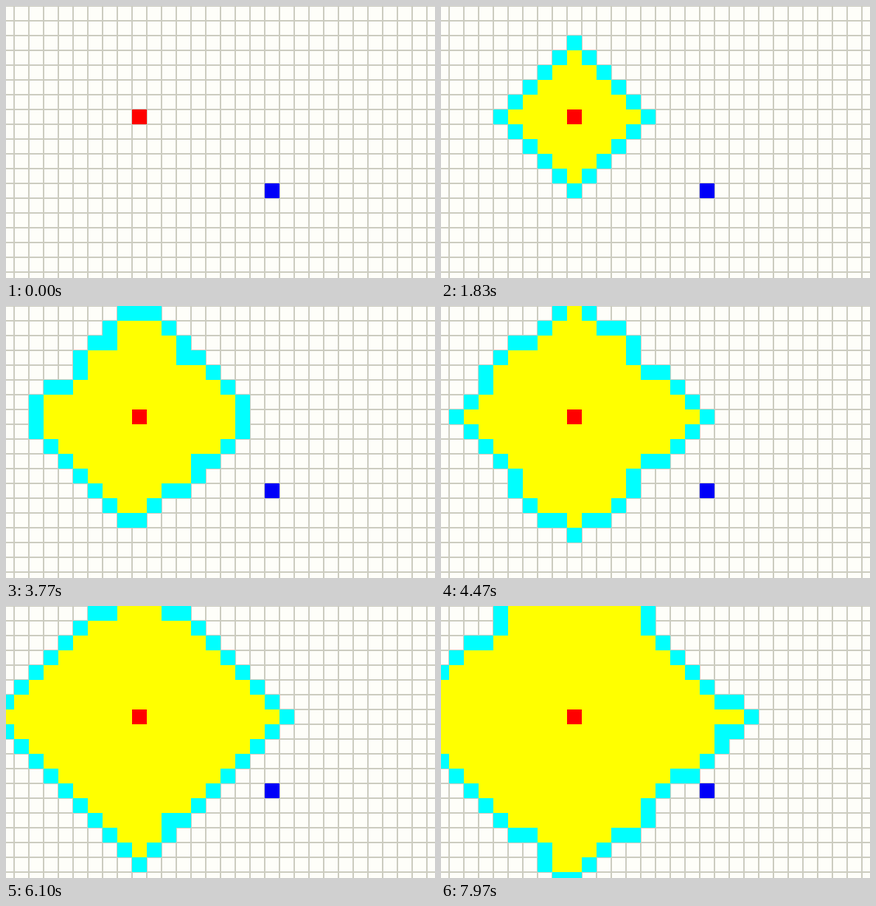
A matplotlib script for the animation above (8 s loop, 582 px wide and 368 px high).

```python
import random

import matplotlib.pyplot as plt
import numpy as np
from matplotlib.animation import FuncAnimation

W, H, CELL, LEFT = 582, 368, 20, 11
FRAMES, LOOP_MS, DEPTH = 240, 8000, 11
START, GOAL = (8, 7), (17, 12)          # column, row

PAPER, LINE = (254, 254, 249), (204, 204, 192)
RED, BLUE = (255, 0, 0), (0, 0, 248)
YELLOW, CYAN = (255, 255, 0), (0, 255, 255)

# Two events per cell (visit it, then open its neighbours), about two a frame.
KEY_FRAMES = [13.5, 80, 153, 239]
KEY_EVENTS = [0, 133, 291, 454]


def on_stage(c, r):
    return c >= -1 and r >= 0


def visit_order():
    """Nearest cells first; ties fall at random, leaning to the sides."""
    rng = random.Random(4)
    ranked = []
    for dx in range(-DEPTH, DEPTH + 1):
        for dy in range(abs(dx) - DEPTH, DEPTH - abs(dx) + 1):
            cell = START[0] + dx, START[1] + dy
            if on_stage(*cell):
                dist = abs(dx) + abs(dy)
                tie = rng.random() + 0.4 * abs(dy) / max(dist, 1)
                ranked.append((dist, tie, cell))
    return [cell for _, _, cell in sorted(ranked)]


def fill(img, cell, color):
    x, y = LEFT + cell[0] * CELL, cell[1] * CELL
    img[max(y, 0):y + CELL, max(x, 0):x + CELL] = color


def empty_grid():
    img = np.empty((H, W, 3), np.uint8)
    img[:] = PAPER
    for y in range(0, H, CELL):
        img[max(y - 1, 0):y + 1] = LINE
    for x in range(LEFT - 1, W, CELL):
        img[:, x:x + 2] = LINE
    return img


ORDER = visit_order()
GRID = empty_grid()


def picture(frame):
    img = GRID.copy()
    events = int(round(np.interp(frame, KEY_FRAMES, KEY_EVENTS)))
    visited, expanded = ORDER[:(events + 1) // 2], ORDER[:events // 2]
    for c, r in expanded:
        for cell in [(c + 1, r), (c - 1, r), (c, r + 1), (c, r - 1)]:
            if on_stage(*cell):
                fill(img, cell, CYAN)
    for cell in visited:
        fill(img, cell, YELLOW)
    fill(img, START, RED)
    fill(img, GOAL, BLUE)
    return img


fig = plt.figure(figsize=(W / 100, H / 100), dpi=100)
ax = fig.add_axes([0, 0, 1, 1])
ax.axis("off")
view = ax.imshow(picture(0), interpolation="nearest", aspect="auto")


def update(frame):
    view.set_data(picture(frame))
    return [view]


anim = FuncAnimation(fig, update, frames=FRAMES, interval=LOOP_MS / FRAMES,
                     repeat=True, repeat_delay=0, blit=False)
plt.show()
```
